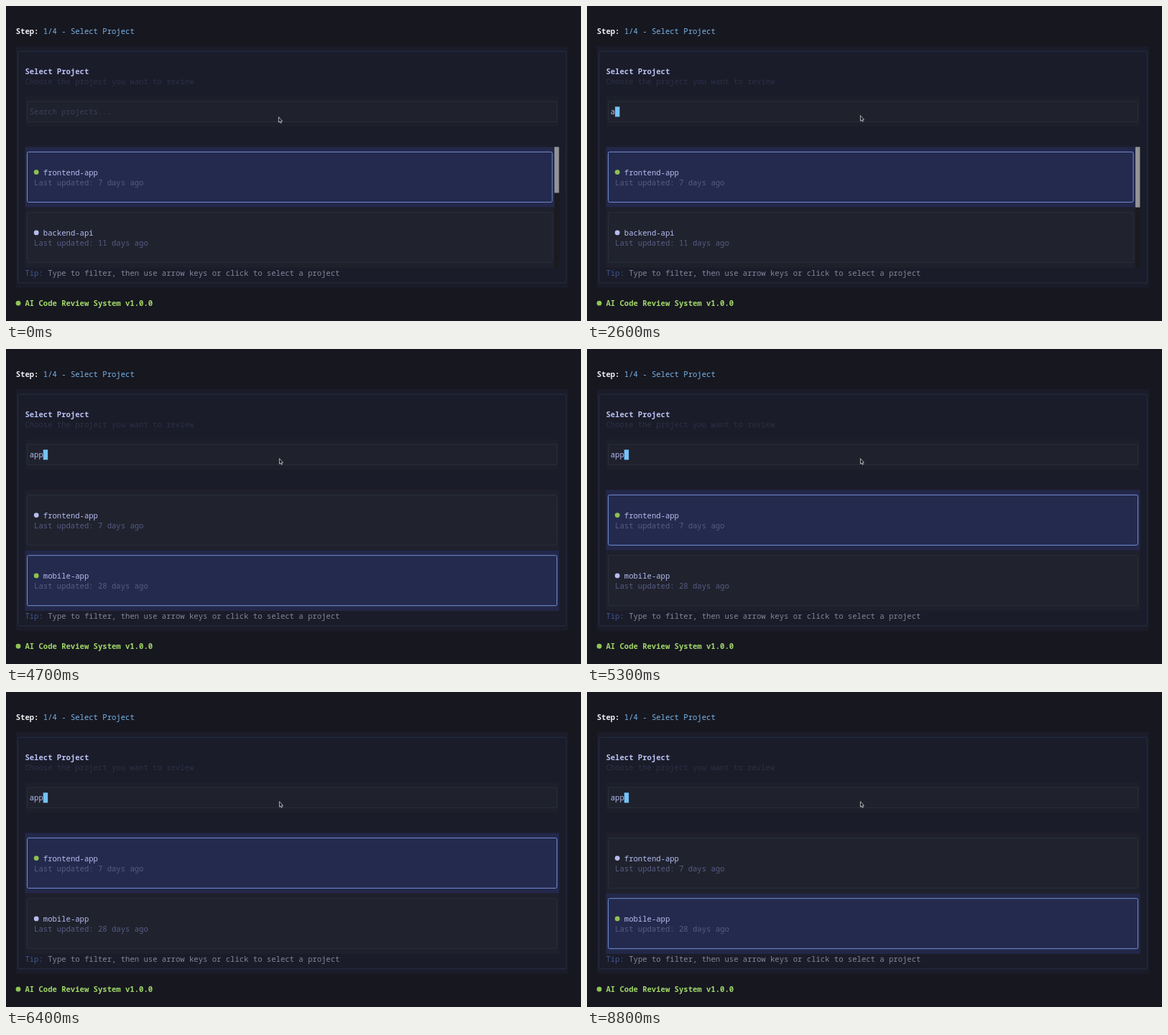
Animation of 800x439 px, one loop 8900 ms. Source, as an HTML page:

```html
<!DOCTYPE html>
<html lang="en">
<head>
<meta charset="utf-8">
<title>Select Project</title>
<style>
  html, body { margin: 0; width: 100%; height: 100%; overflow: hidden; background: #171720; }
  svg { display: block; width: 800px; height: 439px; }
  text { font: 10.58px "Noto Sans Mono", "DejaVu Sans Mono", monospace; white-space: pre; }
  .b { font-weight: 600; }
</style>
</head>
<body>
<svg id="stage" viewBox="0 0 800 439" xmlns="http://www.w3.org/2000/svg"></svg>
<script>
const stage = document.getElementById('stage');
const LOOP = 8900;

function add(tag, attrs, body) {
  const el = document.createElementNS('http://www.w3.org/2000/svg', tag);
  set(el, attrs);
  if (body) el.textContent = body;
  stage.appendChild(el);
  return el;
}
function set(el, attrs) {
  for (const k in attrs) el.setAttribute(k, attrs[k]);
}
const rect = (x, y, width, height, fill) => add('rect', { x, y, width, height, fill });
const frame = (x, y, width, height, stroke, rx = 1) =>
  add('rect', { x, y, width, height, stroke, rx, fill: 'none' });
const label = (x, y, fill, body, cls = '') => add('text', { x, y, fill, class: cls }, body);
const dot = (cx, cy, fill) => add('circle', { cx, cy, r: 3.4, fill });

// Header and panel
label(13.7, 39, '#f0f0f4', 'Step:', 'b');
label(51.8, 39, '#78b4e6', '1/4 - Select Project');
rect(14, 56, 768, 336.5, '#1b1c29');
frame(16.5, 63.2, 762.7, 322.6, '#232f46');
label(26.4, 95, '#bac2f3', 'Select Project', 'b');
label(26.4, 109, '#2c3148', 'Choose the project you want to review');

// Search box
rect(26.5, 126, 743, 42, '#1d1f2a');
rect(29.5, 133, 737, 28.5, '#1f212d');
frame(29.5, 132.8, 737, 28.6, '#292f3d');
const query = label(32.7, 151.3, '#3b4159');
const caret = rect(0, 140.3, 6.4, 14.1, '#75c3f8');
const first = label(32.7, 151.3, '#1b1c29', 'S');

// Project list
const cards = [196.4, 280.7].map(y => ({
  bg: rect(26.5, y, 0, 84.2, ''),
  edge: frame(29.5, y + 7, 0, 70, '', 2),
  dot: dot(42.2, y + 35.2, ''),
  name: label(51.8, y + 39.2, '#b5bdf0'),
  date: label(39.1, y + 53.2, '#565c82')
}));
const track = rect(763, 196.4, 6.4, 168.5, '#1a1a1f');
const thumb = rect(763, 196.4, 6.4, 0, '#939396');

// Footer
label(26.4, 376, '#3f5591', 'Tip:');
label(58.2, 376, '#82869a', 'Type to filter, then use arrow keys or click to select a project');
dot(17, 414.2, '#8fc556');
label(26.4, 418, '#a0d768', 'AI Code Review System v1.0.0', 'b');

const mouse = add('path', {
  d: 'M0 0V7.6L1.6 6.2L2.7 8.6L3.9 8.1L2.9 5.7H5Z',
  fill: '#111116', stroke: '#d8d8dc', 'stroke-width': 0.8, 'stroke-linejoin': 'round'
});

const projects = {
  front: ['frontend-app', '7'],
  back: ['backend-api', '11'],
  mobile: ['mobile-app', '28']
};
const typing = [[2400, 'a'], [2800, 'ap'], [3000, 'app']];
const thumbs = [64, 84.2, 112.3, 0];

function render(t) {
  const typed = typing.reduce((s, [at, q]) => t >= at ? q : s, '');
  const focused = t >= 1500;
  const done = typed === 'app';
  const picked = (t >= 4000 && t < 4900) || t >= 7800 ? 1 : 0;

  query.textContent = typed || 'Search projects...';
  set(query, { fill: typed ? '#b5bdf0' : '#3b4159' });
  set(caret, { x: 32.7 + typed.length * 6.35, visibility: focused ? 'visible' : 'hidden' });
  set(first, { visibility: focused && !typed ? 'visible' : 'hidden' });

  const shown = [projects.front, done ? projects.mobile : projects.back];
  const width = done ? 743 : 736.5;
  cards.forEach((c, i) => {
    const on = i === picked;
    set(c.bg, { width, fill: on ? '#23284a' : '#1e202c' });
    set(c.edge, {
      width: width - 6, stroke: on ? '#718fd2' : '#2b2f3c',
      fill: on ? '#242a4d' : '#20222e'
    });
    set(c.dot, { fill: on ? '#8fc14f' : '#b5bdf0' });
    c.name.textContent = shown[i][0];
    c.date.textContent = `Last updated: ${shown[i][1]} days ago`;
  });

  set(track, { visibility: done ? 'hidden' : 'visible' });
  set(thumb, { height: thumbs[typed.length] });

  const k = Math.min(1, Math.max(0, (t - 1000) / 300));
  set(mouse, { transform: `translate(${379.4 + k} ${154.6 - 2 * k})` });
}

const start = performance.now();
function tick() {
  render((performance.now() - start) % LOOP);
  requestAnimationFrame(tick);
}
tick();
</script>
</body>
</html>
```
